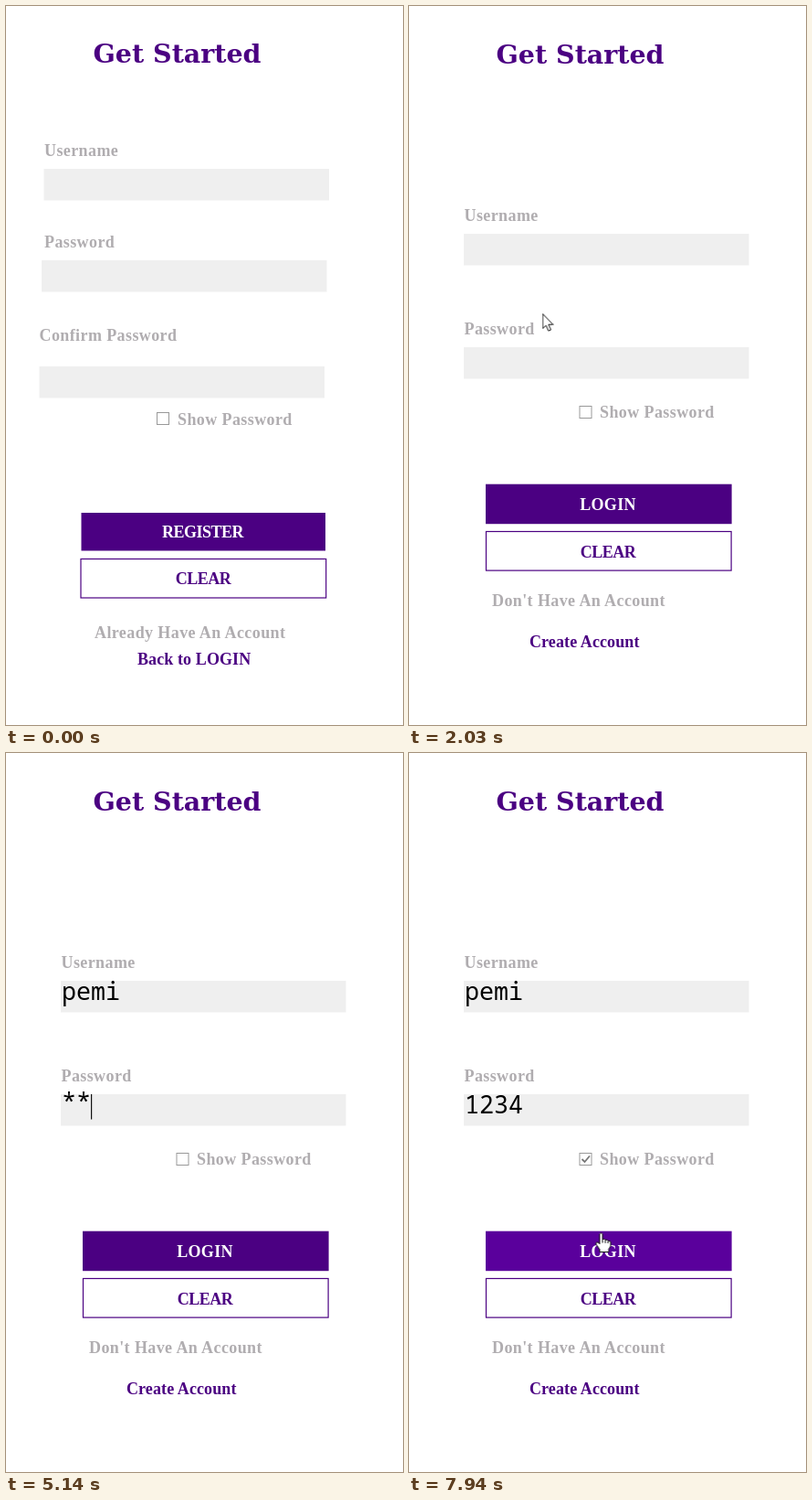
Recreate the animation shown at these times as an HTML page with a canvas. Size 435 by 786 pixels, loop 8000 ms.

```html
<!DOCTYPE html>
<html lang="en">
<head>
<meta charset="utf-8">
<title>Get Started</title>
<style>
html, body { margin: 0; width: 100%; height: 100%; overflow: hidden; background: #fff; }
#stage { position: relative; width: 435px; height: 786px; overflow: hidden; background: #fff; }
canvas, svg { position: absolute; left: 0; top: 0; }
.title { font: bold 28.5px "DejaVu Serif", "Noto Serif", serif; fill: #4b0082; }
.label, .link, .btn { font: bold 18px "Liberation Serif", serif; }
.label { fill: #b0adb0; letter-spacing: .4px; }
.link { fill: #4b0082; letter-spacing: .1px; }
.btn { text-anchor: middle; fill: #4b0082; letter-spacing: -.5px; }
.btn.on { fill: #fff; }
.field { fill: #efefef; }
.solid { fill: #4b0082; }
.outline { fill: #fff; stroke: #4b0082; stroke-width: 1.2; }
.box { fill: #fff; stroke: #999; }
.tick { fill: none; stroke: #777; stroke-width: 1.8; }
.entry {
  position: absolute; left: 61px; width: 0; height: 36px; overflow: hidden;
  font: 500 26.67px/36px "Noto Sans Mono", "DejaVu Sans Mono", monospace; color: #000; white-space: pre;
}
#user { top: 242px; }
#stars { top: 363px; }
#digits { top: 366px; width: 4ch; }
#caret { fill: #111; }
.ptr { fill: #fff; stroke: #111; stroke-width: 1; stroke-linejoin: round; }
#ring { fill: #ff0; opacity: .5; }

#register, #gaps, #fields, #labels, #go, #tick, #user, #stars, #digits,
#caret, #ring, #cursor, #arrow, #beam, #hand { animation: 8s step-end infinite; }
#register { animation-name: register; }
#gaps { animation-name: gaps; }
#fields { animation-name: fields; }
#labels { animation-name: labels; }
#go { animation-name: hover; }
#tick, #digits { animation-name: reveal; }
#user { animation-name: user; }
#stars { animation-name: stars; }
#caret { animation-name: caret; }
#ring { animation-name: ring; }
#cursor { animation-name: cursor; }
#arrow { animation-name: arrow; }
#beam { animation-name: beam; }
#hand { animation-name: hand; }

@keyframes register { 0% { visibility: visible } 14.375% { visibility: hidden } }
@keyframes gaps { 0%, 15.25% { visibility: hidden } 14.375% { visibility: visible } }
@keyframes fields { 0% { visibility: hidden } 14.375% { visibility: visible } }
@keyframes labels { 0% { visibility: hidden } 15.25% { visibility: visible } }
@keyframes hover { 0% { fill: #4b0082 } 99.25% { fill: #5a009c } }
@keyframes reveal { 0% { visibility: hidden } 92.5% { visibility: visible } }
@keyframes user {
  0% { width: 0 } 31.125% { width: 1ch } 32.125% { width: 2ch }
  33.125% { width: 3ch } 35.25% { width: 4ch }
}
@keyframes stars {
  0% { width: 0 } 60.375% { width: 1ch } 64.25% { width: 2ch }
  68% { width: 3ch } 71.875% { width: 4ch } 92.5% { width: 0 }
}
@keyframes caret {
  0% { visibility: hidden; transform: translate(61px, 249px) }
  15.25% { visibility: visible; transform: translate(61px, 249px) }
  24.5% { visibility: hidden; transform: translate(61px, 249px) }
  28.25% { visibility: visible; transform: translate(61px, 249px) }
  31.125% { visibility: visible; transform: translate(77px, 249px) }
  32.125% { visibility: visible; transform: translate(93px, 249px) }
  33.125% { visibility: visible; transform: translate(109px, 249px) }
  35.25% { visibility: visible; transform: translate(125px, 249px) }
  41.875% { visibility: hidden; transform: translate(125px, 249px) }
  46% { visibility: visible; transform: translate(125px, 249px) }
  53.625% { visibility: hidden; transform: translate(61px, 373px) }
  54.5% { visibility: visible; transform: translate(61px, 373px) }
  60.375% { visibility: visible; transform: translate(77px, 373px) }
  64.25% { visibility: visible; transform: translate(93px, 373px) }
  68% { visibility: visible; transform: translate(109px, 373px) }
  71.875% { visibility: visible; transform: translate(125px, 373px) }
  78.875% { visibility: hidden; transform: translate(125px, 373px) }
  82.625% { visibility: visible; transform: translate(125px, 373px) }
  90.5% { visibility: hidden; transform: translate(125px, 373px) }
}
@keyframes ring {
  0%, 14.375%, 54.5%, 92.5% { visibility: hidden; transform: none }
  12.375% { visibility: visible; transform: translate(237px, 714px) }
  53.625% { visibility: visible; transform: translate(164px, 389px) }
  90.5% { visibility: visible; transform: translate(189px, 439px) }
}
@keyframes cursor {
  0% { transform: translate(333px, 782px) }
  .875% { transform: translate(333px, 782px); animation-timing-function: steps(5) }
  5.6875% { transform: translate(262px, 722px); animation-timing-function: steps(4) }
  9.5% { transform: translate(236.5px, 714px) }
  19.675% { transform: translate(236.5px, 714px); animation-timing-function: steps(3) }
  22.525% { transform: translate(190px, 500px); animation-timing-function: steps(3) }
  25.375% { transform: translate(146.5px, 336px) }
  43.05% { transform: translate(146.5px, 336px); animation-timing-function: steps(7) }
  49.75% { transform: translate(164px, 389px) }
  79.78% { transform: translate(164px, 389px); animation-timing-function: steps(5) }
  84.625% { transform: translate(188px, 433px) }
  86.5% { transform: translate(189px, 436px) }
  87.5% { transform: translate(190.5px, 439px) }
  94.25% { transform: translate(190.5px, 439px); animation-timing-function: steps(5) }
  99.25% { transform: translate(210.5px, 524px) }
}
@keyframes arrow {
  0%, 5.6875%, 24.425%, 31.125%, 47.8375%, 84.625%, 99.25% { visibility: hidden }
  .875%, 14.375%, 25.375%, 44%, 82.6875%, 96.25% { visibility: visible }
}
@keyframes beam {
  0%, 25.375%, 61.375%, 82.6875% { visibility: hidden }
  24.425%, 47.8375%, 80.75% { visibility: visible }
}
@keyframes hand {
  0%, 14.375%, 96.25% { visibility: hidden }
  5.6875%, 84.625%, 99.25% { visibility: visible }
}
</style>
</head>
<body>
<div id="stage">
  <canvas id="gaps" width="435" height="786"></canvas>

  <svg width="435" height="786">
    <g id="register">
      <text class="title" x="95.5" y="62">Get Started</text>
      <text class="label" x="42" y="164">Username</text>
      <rect class="field" x="41.5" y="178" width="312.5" height="34.5"/>
      <text class="label" x="42" y="264">Password</text>
      <rect class="field" x="39" y="278" width="312.5" height="34.5"/>
      <text class="label" x="36.5" y="366">Confirm Password</text>
      <rect class="field" x="36.5" y="394" width="312.5" height="34.5"/>
      <rect class="box" x="165.5" y="444.5" width="13" height="13"/>
      <text class="label" x="188" y="458">Show Password</text>
      <rect class="solid" x="82.5" y="554" width="267.5" height="41.5"/>
      <text class="btn on" x="215.5" y="581">REGISTER</text>
      <rect class="outline" x="82" y="604.5" width="268.7" height="42.5"/>
      <text class="btn" x="216" y="632">CLEAR</text>
      <text class="label" x="97" y="691">Already Have An Account</text>
      <text class="link" x="144" y="720">Back to LOGIN</text>
    </g>
    <g id="fields">
      <rect class="field" x="60" y="249" width="312.5" height="34.5"/>
      <rect class="field" x="60" y="373" width="312.5" height="34.5"/>
    </g>
    <g id="labels">
      <text class="title" x="95.5" y="63">Get Started</text>
      <text class="label" x="60.5" y="235">Username</text>
      <text class="label" x="60.5" y="359">Password</text>
      <rect class="box" x="187" y="437.5" width="13" height="13"/>
      <text class="label" x="209" y="450">Show Password</text>
      <rect id="go" x="84" y="522.7" width="269.6" height="43.5"/>
      <text class="btn on" x="218" y="551" style="letter-spacing:.3px">LOGIN</text>
      <rect class="outline" x="84.5" y="574.5" width="268.6" height="42.6"/>
      <text class="btn" x="218" y="602.5">CLEAR</text>
      <text class="label" x="91" y="656">Don't Have An Account</text>
      <text class="link" x="132" y="701">Create Account</text>
    </g>
    <path id="tick" class="tick" d="M189.5 444L192.5 447L198 440.5"/>
  </svg>

  <div id="user" class="entry">pemi</div>
  <div id="stars" class="entry">****</div>
  <div id="digits" class="entry">1234</div>

  <svg width="435" height="786">
    <rect id="caret" width="1.2" height="27.5"/>
    <circle id="ring" r="15"/>
    <g id="cursor">
      <path id="arrow" class="ptr" d="M0 .5V16.5L3.7 13.2L6.3 19.2L9 18L6.4 12.2H11.3Z"/>
      <path id="beam" class="ptr" d="M-4 -9.5H-1L0 -8.5L1 -9.5H4M0 -8.5V8.5M-4 9.5H-1L0 8.5L1 9.5H4" style="fill:none"/>
      <path id="hand" class="ptr" d="M-1.6 2Q0 -1 1.6 2V7.8Q3.6 6.3 4.7 8.4Q6.6 7.2 7.6 9.3Q10 8.7 10.4 11V15L8.3 18.5V21.5H-1.5V18.8L-5.5 13Q-5.6 10 -3 11.2L-1.6 12.8ZM1.6 8V11.5M4.7 8.5V11.8M7.6 9.5V12"/>
    </g>
  </svg>
</div>

<script>
// Desktop seen through the unpainted parts of the new window
const c = document.getElementById('gaps').getContext('2d');
const holes = [
  [87.5, 31, 205.5, 42], [55, 216, 94, 24], [55, 340, 88, 24], [186, 429, 159.5, 29],
  [84, 522.5, 270, 44], [84, 574, 270, 44], [85.5, 638, 203.5, 23.5], [126, 683, 134, 23.5]
];
let seed = 17;
const rnd = () => (seed = seed * 16807 % 2147483647) / 2147483647;
const fill = (color, x, y, w, h) => { c.fillStyle = color; c.fillRect(x, y, w, h); };
const oval = (color, x, y, rx, ry) => {
  c.fillStyle = color;
  c.beginPath();
  c.ellipse(x, y, rx, ry, -.6, 0, 7);
  c.fill();
};
const caption = (s, x, y) => {
  c.font = '16px "Open Sans", "Noto Sans", sans-serif';
  c.fillStyle = '#000';
  c.fillText(s, x + 1, y + 1);
  c.fillStyle = '#fbf6da';
  c.fillText(s, x, y);
};

c.beginPath();
holes.forEach(h => c.rect(...h));
c.clip();

const sky = c.createLinearGradient(0, 31, 0, 706);
[[0, '#15122c'], [.3, '#0d0b1e'], [.46, '#221d40'], [.62, '#352d54'],
 [.75, '#2b3a50'], [.87, '#344d65'], [1, '#587f9a']].forEach(s => sky.addColorStop(...s));
fill(sky, 0, 0, 435, 786);

for (let i = 0; i < 1100; i++) {
  const x = rnd() * 435, y = 320 + rnd() * 400, len = 8 + rnd() * 26;
  c.strokeStyle = rnd() < .5 ? 'rgba(175,198,220,.2)' : 'rgba(5,10,25,.35)';
  c.beginPath();
  c.moveTo(x, y);
  c.lineTo(x + len, y - len * .55);
  c.stroke();
}
for (let i = 0; i < 3200; i++) {
  const x = rnd() * 435, y = rnd() * 720, r = .8 + 4 * rnd() ** 4;
  if (y > 75 && y < 365) continue;
  oval('rgba(6,10,24,.65)', x + .6, y + .8, r * 1.3, r);
  oval('rgba(130,150,180,.4)', x, y, r, r * .75);
  oval('rgba(235,243,255,.85)', x - r * .3, y - r * .3, r * .35 + .2, r * .3 + .2);
}
oval('#07071a', 109, 60, 8, 8);
oval('#33335c', 108, 62, 4, 4);

// Folder and document icons
fill('#fbe29a', 137, 31, 13, 42);
fill('#fff', 150, 40, 25.5, 33);
for (let i = 0; i < 6; i++) {
  fill('#222', 151, 47 + i * 4.4, 8, 2);
  fill('#222', 162, 45 + i * 4.4, 8, 2);
}
fill('#fff', 233, 31, 40, 42);
fill('#15122c', 262, 31, 11, 5);
for (let y = 38; y < 72; y += 5.5) fill('#999', 250, y, 19, 1.5);
fill('#2b579a', 226, 39, 22, 32);

caption('ене_Р...', 54, 222);
caption('Нова', 116, 222);
caption('мнив...', 54, 345);
caption('про', 118, 345);

oval('#9fa052', 85, 542, 7, 7);
fill('#fff', 140, 537, 43, 29);
fill('#1c6f9e', 127, 544, 25, 22);
fill('#d5e8f2', 130, 548, 19, 2);
fill('#d5e8f2', 133, 554, 12, 6);
fill('#151d2e', 154, 547, 27, 19);
fill('#3776a8', 154, 544, 27, 3);
caption('h', 80, 591);
caption('greytiles-h...', 115, 591);

fill('#f7d57c', 137, 642, 30, 20);
fill('#fff', 155, 646, 20, 16);
fill('#5d5648', 148, 648, 17, 14);
fill('#f7d57c', 137, 683, 13, 8);
fill('#fff', 150, 683, 14, 6);
fill('#fbe29a', 164, 683, 11, 5);
</script>
</body>
</html>
```
